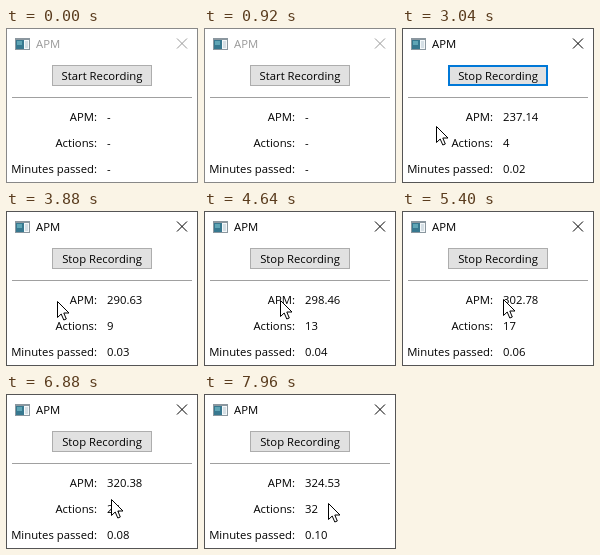
An HTML page for the animation above (8000 ms loop, 192 by 155 pixels).

```html
<!DOCTYPE html>
<html lang="en">
<head>
<meta charset="utf-8">
<title>APM</title>
<style>
  html, body { margin: 0; width: 100%; height: 100%; overflow: hidden; background: #fff; }
  svg { display: block; width: 100vw; height: 100vh; }
  text { font: 11.3px "Open Sans", "Noto Sans", sans-serif; fill: #000; }
  .label { text-anchor: end; }
  .crisp { shape-rendering: crispEdges; }
</style>
</head>
<body>
<svg viewBox="0 0 192 155">
  <rect id="frame" class="crisp" x=".5" y=".5" width="191" height="154" fill="#fff"/>

  <g class="crisp">
    <rect x="9" y="10" width="15" height="12" fill="#8b979f"/>
    <rect x="10" y="12" width="13" height="9" fill="#f4f8fa"/>
    <rect x="10" y="12" width="8" height="9" fill="#37788f"/>
    <rect x="11" y="13" width="5" height="4" fill="#5fa5b5"/>
    <rect x="19" y="13" width="3" height="7" fill="#d5dfe5"/>
  </g>
  <text id="title" x="30" y="20">APM</text>
  <path id="close" d="M171 10.5l10 10m0-10l-10 10" fill="none"/>

  <rect id="button" class="crisp"/>
  <text id="caption" x="96" y="52" text-anchor="middle"></text>
  <path class="crisp" d="M6 69.5H186" stroke="#a0a0a0"/>

  <text class="label" x="91" y="93">APM:</text>
  <text class="label" x="91" y="119">Actions:</text>
  <text class="label" x="91" y="145">Minutes passed:</text>
  <text id="apm" x="101" y="93"></text>
  <text id="actions" x="101" y="119"></text>
  <text id="minutes" x="101" y="145"></text>

  <path id="cursor" d="M.5 .5V16.5L4.2 13L6.8 19L9.3 18L6.8 12H12Z" fill="#fff" stroke="#000"/>
</svg>
<script>
const LOOP = 8000, STEP = 40;
const ACTIVATE = 1760, START = 2030, BLUR = 3460, ENTER = 1000;

// time, x, y of the pointer tip
const pointerPath = [
  [ENTER, 104, 156], [1720, 71, 45], [2060, 71, 45], [3040, 34, 98],
  [3880, 51, 90], [5400, 101, 88], [6880, 105, 105], [7960, 124, 109]
];

// time, recorded seconds, running action count
const recording = [
  [START, 0, 0], [3040, 1.01206, 4.5], [3880, 1.85803, 9.5],
  [5400, 3.36878, 17.5], [6880, 4.86922, 26.5], [7960, 5.91625, 32.5]
];

const el = id => document.getElementById(id);
const setAttrs = (id, attrs) => {
  for (const name in attrs) el(id).setAttribute(name, attrs[name]);
};
const linear = u => u;
const smooth = u => u * u * (3 - 2 * u);

function sample(keys, time, ease) {
  let i = 1;
  while (i < keys.length - 1 && keys[i][0] < time) i++;
  const a = keys[i - 1], b = keys[i];
  const u = ease(Math.min(1, Math.max(0, (time - a[0]) / (b[0] - a[0]))));
  return a.slice(1).map((v, k) => v + (b[k + 1] - v) * u);
}

function drawButton(time) {
  const pressed = time >= ACTIVATE && time < START;
  const focused = time >= START && time < BLUR;
  const hovered = time >= 1600 && time < 2360 && !pressed;
  const inset = focused ? 1 : .5;
  setAttrs("button", {
    x: 46 + inset, y: 37 + inset,
    width: 100 - 2 * inset, height: 21 - 2 * inset,
    fill: pressed ? "#d5edf7" : hovered ? "#e5f1fb" : "#e1e1e1",
    stroke: pressed ? "#2c7291" : hovered || focused ? "#0078d7" : "#adadad",
    "stroke-width": 2 * inset
  });
  el("caption").textContent = time < START ? "Start Recording" : "Stop Recording";
}

function drawValues(time) {
  let values = ["-", "-", "-"];
  if (time >= START) {
    const [seconds, count] = sample(recording, time, linear);
    const minutes = seconds / 60, actions = Math.floor(count);
    const apm = minutes ? actions / minutes : 0;
    values = [apm.toFixed(2), actions, minutes.toFixed(2)];
  }
  ["apm", "actions", "minutes"].forEach((id, i) => el(id).textContent = values[i]);
}

function draw(time) {
  const active = time >= ACTIVATE;
  setAttrs("frame", { stroke: active ? "#555" : "#888" });
  setAttrs("close", { stroke: active ? "#000" : "#999" });
  el("title").style.fill = active ? "#000" : "#999";
  drawButton(time);
  drawValues(time);
  const [x, y] = sample(pointerPath, time, smooth).map(Math.round);
  setAttrs("cursor", {
    transform: `translate(${x} ${y})`,
    visibility: time < ENTER ? "hidden" : "visible"
  });
}

const began = performance.now();
function tick() {
  const time = Math.max(0, performance.now() - began) % LOOP;
  draw(Math.floor(time / STEP) * STEP);
  requestAnimationFrame(tick);
}
tick();
</script>
</body>
</html>
```
